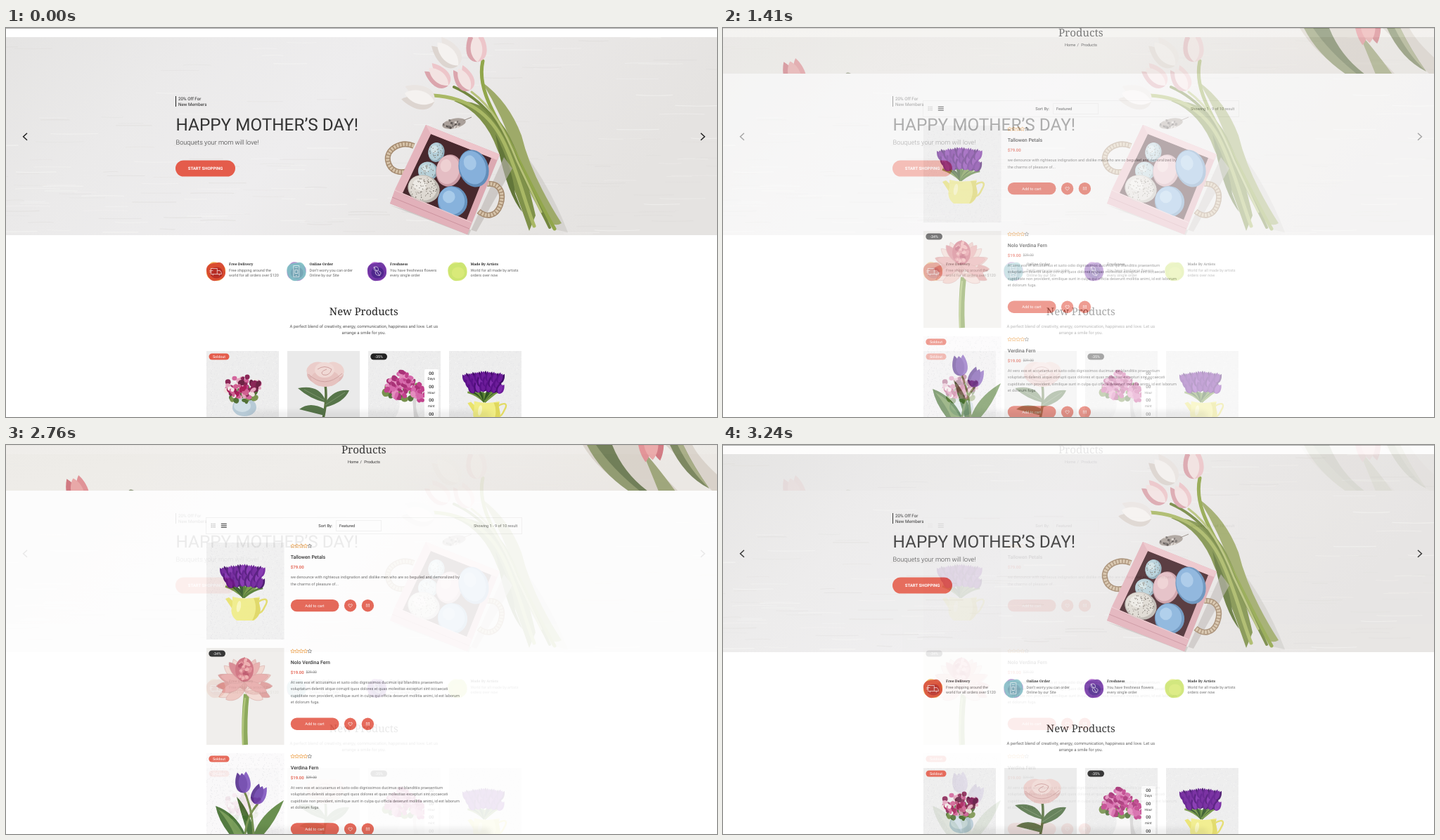
Write an HTML page that moves like this. It is 1011 by 554 pixels and loops after 3300 ms.

```html
<!DOCTYPE html>
<html lang="en">
<head>
<meta charset="utf-8">
<title>Flower shop</title>
<style>
  html, body { margin: 0; width: 100%; height: 100%; overflow: hidden; background: #fff; }
  svg { display: block; width: 100%; height: 100%; }
  text { font-family: Roboto, sans-serif; text-rendering: geometricPrecision; }
  .serif { font-family: "Noto Serif", serif; }
  .mid { text-anchor: middle; }
  .end { text-anchor: end; }
  .medium { font-weight: 500; }
  .bold { font-weight: 700; }
  .light { font-weight: 300; }
  .strike { text-decoration: line-through; }
</style>
</head>
<body>
<svg id="stage" viewBox="0 0 1011 554"></svg>
<script>
const RED = '#e45c4b', INK = '#222', GREY = '#666';
const WHITE_PETALS = ['#ddd5d0', '#eae5e2', '#f5f2f0'];
const PINK_PETALS = ['#dba5ad', '#edc6ca', '#f3e3e2'];
const CORAL_PETALS = ['#cf6f78', '#e08a8f', '#e9a2a2'];
const VIOLET_PETALS = ['#583191', '#8157c0', '#6d43ac'];

let seed = 7;
const rand = () => (seed = (seed * 16807) % 2147483647) / 2147483647;
const between = (a, b) => a + (b - a) * rand();
const pick = list => list[Math.floor(rand() * list.length)];
const repeat = (n, draw) => Array.from({ length: n }, (_, i) => draw(i)).join('');

const rect = (x, y, w, h, fill, more = '') =>
  `<rect x="${x}" y="${y}" width="${w}" height="${h}" fill="${fill}" ${more}/>`;
const oval = (x, y, rx, ry, fill, turn = 0) =>
  `<ellipse rx="${rx}" ry="${ry}" fill="${fill}" transform="translate(${x} ${y}) rotate(${turn})"/>`;
const shape = (d, fill, more = '') => `<path d="${d}" fill="${fill}" ${more}/>`;
const line = (d, color, width, more = '') =>
  `<path d="${d}" fill="none" stroke="${color}" stroke-width="${width}" ${more}/>`;
const text = (x, y, size, words, fill = GREY, cls = '') =>
  `<text x="${x}" y="${y}" font-size="${size}" fill="${fill}" class="${cls}">${words}</text>`;
const group = (transform, content) => `<g transform="${transform}">${content}</g>`;
const clip = (id, content) => `<g clip-path="url(#${id})">${content}</g>`;

// Random petals or dots inside an ellipse
const scatter = (x, y, rx, ry, n, size, colors) => repeat(n, () => {
  const a = between(0, 6.28), r = Math.sqrt(rand());
  return oval(x + Math.cos(a) * r * rx, y + Math.sin(a) * r * ry,
    size * between(.7, 1.2), size * between(.5, .9), pick(colors), between(0, 180));
});

const tulip = (x, y, turn, scale, [left, right, front]) =>
  group(`translate(${x} ${y}) rotate(${turn}) scale(${scale})`,
    shape('M0 20C-21 18-18-9-9-24C1-13 4 4 0 20Z', left) +
    shape('M0 20C21 18 18-9 9-24C-1-13-4 4 0 20Z', right) +
    shape('M0 20C-13 9-11-12 0-22C11-12 13 9 0 20Z', front));

const badge = (x, y, w, words, fill) =>
  rect(x, y, w, 9.2, fill, 'rx="4.6"') + text(x + w / 2, y + 6.5, 5.3, words, '#fff', 'mid');

const card = (x, y, w, h, fill = '#ededed') =>
  rect(x, y, w, h, fill) + rect(x, y, w, h, 'url(#grain)');

function tulipJug() {
  const leaves = repeat(15, i => line(`M338 217Q${325 + i * 2} 205 ${312 + i * 3.8} ${between(194, 204)}`,
    pick(['#4f7a2d', '#71943f', '#2f5423']), 3));
  const heads = repeat(19, i => {
    const row = i % 3, x = 312 + (i * 2.85) + (row - 1) * 1.2;
    const y = 178 + row * 8 + Math.abs(x - 338) * .14;
    return tulip(x, y, (x - 338) * .9, .37, pick([['#4d0e78', '#6d1b9b', '#7f2bad'], ['#5a1189', '#3f0a66', '#6c1c99']]));
  });
  return leaves + heads +
    line('M359 223C372 216 373 222 368 230C365 237 363 239 356 241', '#e2db65', 2.6) +
    shape('M324 237L312 219L317 217L328 227Z', '#e9e36b') +
    shape('M322 216Q341 221 361 216C357 224 364 232 361 239Q357 248 352 250H328C320 244 319 235 322 228Z', '#f1ed86') +
    shape('M352 218H361C357 224 364 232 361 239Q357 248 350 250Q359 233 352 218Z', '#dfd75d') +
    oval(331, 230, 3, 8, '#faf8bc', 10);
}

function heroFlowers() {
  const stem = (d, color, w) => line(d, color, w, 'stroke-linecap="round"');
  return shape('M699 139Q760 190 799 291L776 286Q728 210 691 155Z', '#c9c6c2', 'opacity=".55"') +
    shape('M677 77Q715 105 733 153Q747 211 790 278Q779 285 767 271Q738 220 725 180Q706 125 677 77Z', '#9eaa69') +
    shape('M637 104Q682 101 711 145Q735 186 753 267L744 289Q719 216 699 174Q680 121 637 104Z', '#7f914a') +
    stem('M678 47C669 88 697 126 720 171S758 248 780 286', '#91a64b', 5) +
    stem('M607 96C657 99 689 122 709 165S737 246 751 282', '#a9b865', 5) +
    stem('M637 84C683 104 710 147 727 189S759 254 773 284', '#73863f', 4) +
    stem('M662 91C691 112 710 147 727 190L761 262', '#b6c179', 3) +
    shape('M696 151Q720 199 724 236L734 262Q710 233 696 151Z', '#62763a') +
    tulip(669, 30, -4, .92, PINK_PETALS) + tulip(629, 38, -42, 1.05, WHITE_PETALS) +
    tulip(616, 70, -48, .88, PINK_PETALS) + tulip(652, 74, -28, .83, PINK_PETALS) +
    tulip(589, 99, -74, 1.05, WHITE_PETALS) +
    oval(637, 136, 17, 7, '#aaa09a', -12) + scatter(634, 137, 13, 6, 22, 1.8, ['#554e4b', '#dad3cd', '#77706d']) +
    line('M650 132L662 127', '#948a83', 1);
}

function eggBox() {
  const rope = d => line(d, '#a58b70', 8) + line(d, '#d6c3a9', 5, 'stroke-dasharray="3 1.4"');
  const egg = (x, y, rx, ry, turn, dark, mid, glow) =>
    oval(x, y, rx, ry, dark, turn) + oval(x - 1.4, y - 1.2, rx * .88, ry * .9, mid, turn) +
    oval(x - rx * .25, y - ry * .3, rx * .42, ry * .4, glow, turn);
  const speckles = (x, y, rx, ry, n) => scatter(x, y, rx * .9, ry * .9, n, .75, ['#6b665f', '#80796f']);
  return shape('M545 252L658 295L708 184L720 200L669 290Z', '#bdb6b2', 'opacity=".6"') +
    rope('M580 168C561 160 540 173 543 189S561 207 570 204') +
    rope('M684 222C702 220 709 235 703 252S683 270 672 261') +
    shape('M597 138L702 180L656 294L546 250Z', '#dca9b2') +
    shape('M604 151L690 185L655 273L563 235Z', '#48282d') +
    shape('M597 138L702 180L698 188L600 149Z', '#edc4ca') +
    shape('M597 138L604 151L564 235L553 230Z', '#e4b5bd') +
    egg(612, 177, 11.5, 14, 10, '#91afbd', '#b4cfd9', '#d1e2e6') + speckles(612, 177, 11, 13, 28) +
    egg(600, 204, 14, 13.5, 0, '#90aebb', '#b8d1d9', '#d2e2e5') + speckles(600, 204, 13, 13, 30) +
    egg(630, 203, 18.5, 23, 12, '#cb9ca5', '#e4bdc3', '#eed0d2') +
    egg(665, 200, 21, 27, -18, '#628db9', '#86b0db', '#a6c8e8') +
    egg(594, 229, 23, 19.5, 18, '#bcb7b0', '#ded9d2', '#edeae5') + speckles(594, 229, 21, 18, 75) +
    egg(635, 247, 21, 22, -20, '#6591bd', '#87b2dc', '#a8cbea') +
    shape('M553 230L569 240Q612 255 662 278L656 294L546 250Z', '#e2b1ba') +
    line('M549 241L659 286', '#c98f9b', .9) + line('M553 231L662 277', '#efcbd0', 1.2);
}

function hero() {
  const streaks = repeat(190, () => {
    const x = between(-20, 1000), y = rand() < .65 ? between(185, 294) : between(14, 190);
    return line(`M${x} ${y}q${between(8, 35)} ${between(-2, 2)} ${between(20, 70)} 0`,
      pick(['#f8f7f6', '#dedcda']), between(.4, 1.4), 'opacity=".5"');
  });
  return clip('heroClip', rect(0, 13, 1011, 282, 'url(#wall)') + streaks + heroFlowers() + eggBox()) +
    line('M30 149.8L24.6 154.8L30 159.8M988 149.8L993.4 154.8L988 159.8', INK, 1.5) +
    rect(241, 97, 1, 15, INK) +
    text(245, 103, 6.25, '20% Off For', INK) + text(245, 110.7, 6.25, 'New Members', INK) +
    text(241.5, 146, 24.3, 'HAPPY MOTHER’S DAY!', '#333') +
    text(241.5, 165.6, 9.2, 'Bouquets your mom will love!', '#333', 'light') +
    rect(241, 188.5, 85, 23, RED, 'rx="11.5"') +
    text(283.6, 202.1, 6, 'START SHOPPING', '#fff', 'mid bold');
}

function features() {
  const blob = 'M-13 1C-15-9-7-12 1-12C9-15 13-7 13-2C16 7 9 12 2 13C-6 16-12 9-13 1Z';
  const truck = 'M-7-4H2V4H-7ZM2-1H6L8 2V4H2M-4 4v2M5 4v2M-9-1h5M-9 1h3';
  const phone = 'M-4-8H4V8H-4ZM-2-5H2M-2-2H2V3H-2ZM-1 6H1';
  const flower = 'M-4-6L4 6M-4-6Q3-8 2-1Q-5 1-4-6M4 6Q-3 6-2 0M4 6Q8 1 3 0';
  return [
    ['Free Delivery', 'Free shipping around the', 'world for all orders over $120', ['#f0b45c', '#d6402b', '#b62d25'], truck],
    ['Online Order', 'Don’t worry you can order', 'Online by our Site', ['#b491cf', '#7dbfc3', '#75a5b5'], phone],
    ['Freshness', 'You have freshness flowers', 'every single order', ['#b86fd2', '#6930a0', '#4e278c'], flower],
    ['Made By Artists', 'World for all made by artists', 'orders over now', ['#edf0a1', '#c9e36a', '#d9ea79'], ''],
  ].map(([title, first, second, [edge, main, core], icon], i) => {
    const x = 298.3 + i * 114.5;
    return group(`translate(${x} 346.5)`,
        group('rotate(35)', shape(blob, edge)) + shape(blob, main, 'opacity=".9"') +
        oval(1, 2, 9, 8, core) + line(icon, '#fff', .8, 'opacity=".8"')) +
      text(x + 18.8, 338.2, 5, title, INK, 'serif bold') +
      text(x + 18.8, 347.3, 5.45, first) + text(x + 18.8, 354, 5.45, second);
  }).join('');
}

function newProducts() {
  const bouquet = oval(339, 540, 17, 13, '#b7cad6') + oval(336, 538, 12, 9, '#d1dfe6') +
    scatter(337, 521, 21, 12, 26, 5, ['#517136', '#7b944e']) +
    scatter(337, 512, 25, 16, 55, 4.5, ['#bc3e83', '#8b2757', '#e4a3bd', '#eee4df', '#d3669d', '#6d2345']) +
    scatter(330, 517, 13, 8, 18, 4, ['#f1e5e4', '#a91f59', '#d06091']);
  const rose = line('M454 508Q457 530 451 556', '#587140', 3.5) +
    shape('M453 533Q432 528 415 513Q445 507 454 530ZM454 543Q432 531 417 543Q441 549 453 552ZM455 532Q467 514 488 516Q481 533 455 540Z', '#57754a') +
    line('M452 530L424 515M454 537L482 519', '#89a077', .7) +
    oval(454, 493, 26, 16, '#dfb8b6') + oval(441, 486, 14, 10, '#ebcdca', -20) +
    oval(467, 487, 14, 11, '#edd2ce', 20) + oval(454, 499, 20, 12, '#e6c2bf') +
    oval(453, 487, 14, 11, '#f0d9d5') + line('M443 486Q453 479 463 486Q460 496 451 494Q445 490 456 486', '#cfa19f', 1) +
    line('M430 493Q453 515 478 492', '#cfa3a2', 1);
  const peony = shape('M558 527H585Q580 538 587 554H554Q563 540 558 527Z', '#f9f8f8') +
    shape('M578 527H585Q580 538 587 554H580Z', '#d7d6d6') +
    scatter(563, 517, 27, 14, 26, 5, ['#55743d', '#77914d']) +
    [[549, 508], [565, 499], [579, 511], [560, 518], [588, 521]].map(([x, y]) =>
      scatter(x, y, 11, 10, 21, 4.2, ['#c1428c', '#d568aa', '#e48dbe', '#a93277'])).join('');
  const timer = rect(595, 486, 20, 70, '#fff', 'rx="2"') +
    ['Days', 'Hour', 'mint', ''].map((unit, i) =>
      text(604.8, 493.5 + i * 19.4, 6.2, '00', INK, 'mid medium') +
      text(604.8, 501.2 + i * 19.4, 4.8, unit, INK, 'mid')).join('');
  return text(508.8, 409, 14.8, 'New Products', INK, 'serif mid') +
    text(508.8, 427.4, 6, 'A perfect blend of creativity, energy, communication, happiness and love. Let us', '#555', 'mid') +
    text(508.8, 436.3, 6, 'arrange a smile for you.', '#555', 'mid') +
    card(285, 460, 103, 94) + rect(400, 460, 103, 94, '#eaeaea') + card(515, 460, 103, 94) + card(630, 460, 103, 94) +
    bouquet + rose + peony + timer +
    group('translate(366.2 330.7) scale(.93)', tulipJug()) +
    badge(288.5, 463.4, 29, 'Soldout', RED) + badge(518.3, 463.4, 23.7, '-35%', INK);
}

function banner() {
  const leaf = (d, color) => shape(d, color);
  return clip('bannerClip', rect(0, 0, 1011, 65, 'url(#sand)') +
    shape('M820 0Q843 38 889 65H955Q924 34 900 0ZM938 0L1004 65H1011V42Q985 18 976 0Z', '#d8d1c8') +
    leaf('M826 0H855Q868 35 907 66H886Q845 38 826 0Z', '#899466') +
    leaf('M839 0H862Q878 40 913 66H902Q862 34 839 0Z', '#65744a') +
    leaf('M903 5Q922 25 952 66H928Q914 31 903 5Z', '#98a071') +
    leaf('M944 0H963Q978 31 1000 62Q964 44 944 0Z', '#727f54') +
    leaf('M955 0H963Q978 31 1000 62Q973 37 955 0Z', '#a1a77c') +
    tulip(917, -4, 174, 1.15, CORAL_PETALS) +
    tulip(102, 68, -18, .98, CORAL_PETALS) + shape('M174 66Q176 61 182 65Z', '#8b9478')) +
    text(508.8, 12, 15.2, 'Products', INK, 'serif mid') +
    text(486, 25.7, 5.7, 'Home', INK) + text(503.5, 25.7, 5.7, '/', INK) + text(509.2, 25.7, 5.7, 'Products', INK);
}

function toolbar() {
  return rect(284.5, 103.5, 449, 23, '#fff', 'stroke="#f2f2f2"') +
    repeat(9, i => rect(291.5 + i % 3 * 2.3, 111.6 + Math.floor(i / 3) * 2.3, 1.6, 1.6, '#ccc')) +
    [111.7, 114.2, 116.7].map(y => rect(305.8, y, 8, 1.2, '#444')).join('') +
    text(444.3, 116.9, 5.75, 'Sort By:', INK) +
    rect(469.5, 107.5, 64, 15, '#fff', 'stroke="#f2f2f2"') + text(474, 116.9, 5.7, 'Featured', INK) +
    text(727.4, 116.9, 5.55, 'Showing 1 - 9 of 10 result', GREY, 'end');
}

function gingerFlower() {
  const petal = (i, n, ry, y, colors) => {
    const turn = -115 + 230 * i / (n - 1);
    return group(`translate(339 ${y}) rotate(${turn})`,
      shape(`M0 0C-10 ${-ry * .4}-6 ${-ry * .85} 0 ${-ry}C6 ${-ry * .85} 10 ${-ry * .4} 0 0Z`, pick(colors), 'stroke="#d09a98" stroke-width=".5"'));
  };
  return line('M342 355Q338 390 340 427', '#81a04c', 8) + line('M340 360Q336 390 337 427', '#a8bf6d', 2.5) +
    repeat(11, i => petal(i, 11, 40, 342, ['#e9bfba', '#dd9b99', '#f0d5ce'])) +
    repeat(9, i => petal(8 - i, 9, 29, 350, ['#f2d8d1', '#e2a5a2', '#edc5be'])) +
    repeat(7, i => petal(i, 7, 35, 337, ['#d7828c', '#e7aaa9'])) +
    oval(339, 320, 13, 17, '#cd6b7a') + scatter(339, 320, 10, 14, 26, 3.2, ['#b94d63', '#df8791', '#eda9aa']);
}

function violetTulips() {
  return shape('M341 556Q327 524 298 514Q302 535 319 556ZM344 556Q330 510 328 501Q344 516 355 556Z', '#436f2f') +
    shape('M352 556Q361 526 395 506Q383 537 365 556Z', '#5b853e') +
    shape('M338 556Q324 530 302 519Q319 540 325 556Z', '#6f964c') +
    line('M338 492Q350 515 352 556M358 511Q342 529 340 556', '#718f48', 3) +
    tulip(337, 482, -7, .68, VIOLET_PETALS) + tulip(359, 499, 24, .65, VIOLET_PETALS);
}

function listItem(top, title, price, oldPrice, lines) {
  const star = 'M0-2.9L.9-1L2.8-.9L1.4.5L1.8 2.5L0 1.5L-1.8 2.5L-1.4.5L-2.8-.9L-.9-1Z';
  const lastLine = top + 49.3 + (lines.length - 1) * 9.4;
  const middle = lastLine + 31;
  return repeat(5, i => group(`translate(${407.6 + i * 6.05} ${top + 4.8})`, line(star, i < 4 ? '#ec9a3c' : '#777', .75))) +
    text(404.8, top + 23.3, 7, title, INK, 'medium') +
    text(404.8, top + 37, 6, price, RED, 'bold') + text(426.6, top + 36.5, 4.9, oldPrice, GREY, 'strike') +
    lines.map((words, i) => text(404.8, top + 51.2 + i * 9.4, 5.6, words)).join('') +
    rect(404.8, middle - 8.8, 68.7, 17.4, RED, 'rx="8.7"') +
    text(439, middle + 1.9, 5.55, 'Add to cart', '#fff', 'mid') +
    oval(489.6, middle, 8.7, 8.7, RED) + oval(514.4, middle, 8.7, 8.7, RED) +
    group(`translate(489.6 ${middle})`, line('M0 2.4C-5-1-1.8-3.6 0-1.2C1.8-3.6 5-1 0 2.4Z', '#fff', .7)) +
    group(`translate(514.4 ${middle})`, line('M-2-2.2V2.2M0-2.2V2.2M2-2.2V2.2M-2.4-1.9H-1M1-1.9H2.5', '#fff', .6));
}

function productList() {
  const latin = ['At vero eos et accusamus et iusto odio dignissimos ducimus qui blanditiis praesentium',
    'voluptatum deleniti atque corrupti quos dolores et quas molestias excepturi sint occaecati',
    'cupiditate non provident, similique sunt in culpa qui officia deserunt mollitia animi, id est laborum',
    'et dolorum fuga.'];
  return card(285, 139, 110.5, 138, '#f1f1f1') + rect(285, 289, 110.5, 138, '#efedea') + card(285, 439, 110.5, 115, '#fbfafb') +
    tulipJug() + gingerFlower() + violetTulips() +
    badge(288.3, 292.4, 23.7, '-34%', INK) + badge(288.3, 442.4, 29.3, 'Soldout', RED) +
    listItem(139, 'Tallowen Petals', '$79.00', '', [
      'we denounce with righteous indignation and dislike men who are so beguiled and demoralized by',
      'the charms of pleasure of...']) +
    listItem(288.8, 'Nolo Verdina Fern', '$19.00', '$29.00', latin) +
    listItem(438.6, 'Verdina Fern', '$19.00', '$29.00', latin);
}

const gradient = (id, ...colors) => `<linearGradient id="${id}" x2="1" y2=".25">${
  colors.map((c, i) => `<stop offset="${i / (colors.length - 1)}" stop-color="${c}"/>`).join('')}</linearGradient>`;
const defs = `<defs>${gradient('wall', '#e5e4e3', '#ebeaea', '#eeedee', '#e9e7e6', '#e5e3e1')}${gradient('sand', '#eeece8', '#f0eeea', '#ece9e5')}
  <clipPath id="heroClip">${rect(0, 13, 1011, 282, '#000')}</clipPath>
  <clipPath id="bannerClip">${rect(0, 0, 1011, 65, '#000')}</clipPath>
  <pattern id="grain" width="37" height="31" patternUnits="userSpaceOnUse">${
    repeat(110, () => rect(between(0, 36), between(0, 30), .9, .7, pick(['#dedee2', '#fafafa', '#e3e2e6'])))}</pattern>
  <filter id="soft" x="-10%" y="-100%" width="120%" height="300%"><feGaussianBlur stdDeviation="5 3"/></filter></defs>`;
const paper = rect(0, 0, 1011, 554, '#fff');
const bottomShade = rect(345, 545, 345, 20, '#000', 'rx="8" opacity=".06" filter="url(#soft)"');

const stage = document.getElementById('stage');
stage.innerHTML = defs +
  `<g>${paper}${rect(0, 0, 1011, 1, '#a8a8a8')}${hero()}${features()}${newProducts()}${bottomShade}</g>` +
  `<g id="listing">${paper}${banner()}${toolbar()}${productList()}${bottomShade}</g>`;
const listing = document.getElementById('listing');

// Each page holds, then dissolves into the other in ten 60 ms steps
const HALF = 1650, HOLD = 1110, STEP = 60;
function frame() {
  const time = performance.now() % (2 * HALF);
  const local = time % HALF;
  const mix = local < HOLD ? 0 : (Math.floor((local - HOLD) / STEP) + 1) / 10;
  listing.setAttribute('opacity', time < HALF ? mix : 1 - mix);
  requestAnimationFrame(frame);
}
frame();
</script>
</body>
</html>
```
